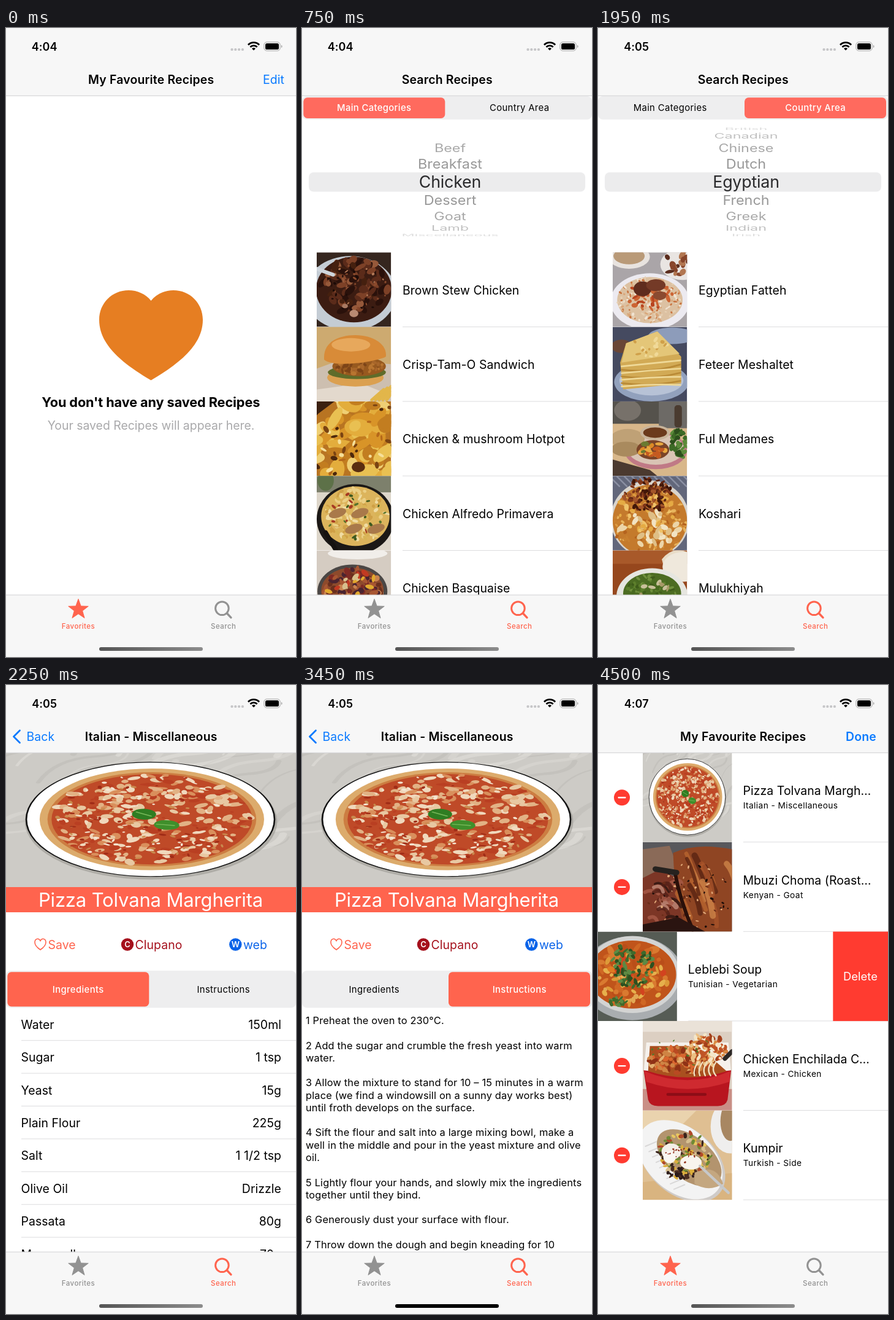
These frames come from a looping animation (473x1024 px, 5.25 s). An HTML page:

```html
<!DOCTYPE html>
<html lang="en">
<head>
<meta charset="utf-8">
<title>Recipe app</title>
<style>
  html, body { margin: 0; width: 100%; height: 100%; overflow: hidden; background: #fff; }
  #stage { display: block; width: 473px; height: 1024px; }
  text { font: 400 19.42px Inter, "Open Sans", sans-serif; letter-spacing: .07px; white-space: pre; }
  .mid { text-anchor: middle; }
  .end { text-anchor: end; }
  .semi { font-weight: 600; letter-spacing: .2px; }
  .clock { font-size: 18px; font-weight: 600; }
  .headline { font-size: 21.7px; font-weight: 700; letter-spacing: -.1px; }
  .hint { letter-spacing: 0; }
  .tab { font-size: 11.5px; font-weight: 500; letter-spacing: .45px; }
  .seg { font-size: 14.85px; letter-spacing: .35px; }
  .on { font-weight: 500; }
  .chosen { font-size: 26.8px; letter-spacing: -.2px; }
  .wheel { font-size: 23.4px; letter-spacing: 0; }
  .banner { font-size: 31px; letter-spacing: -.15px; }
  .badge { font-size: 13px; font-weight: 600; }
  .step { font-size: 16.4px; letter-spacing: .16px; }
  .sub { font-size: 13.7px; letter-spacing: .42px; }
  .delete { font-size: 18.4px; }
  .scene { visibility: hidden; animation: show 5250ms step-end calc(var(--i) * 750ms) infinite; }
  @keyframes show { 0% { visibility: visible; } 14.2858% { visibility: hidden; } }
</style>
</head>
<body>
<svg id="stage" viewBox="0 0 473 1024" xmlns="http://www.w3.org/2000/svg"></svg>
<script>
const ACCENT = '#ff644e', ACCENT_SOFT = '#ff6a5e', BLUE = '#0a7aff', RED = '#ff3b30', GREY = '#929292';

// ---------- primitives ----------
const text = (x, y, s, cls = '', fill = '#000', extra = '') =>
  `<text x="${x}" y="${y}" class="${cls}" fill="${fill}" ${extra}>${s.replace(/&/g, '&amp;')}</text>`;
const rect = (x, y, w, h, fill, r = 0, extra = '') =>
  `<rect x="${x}" y="${y}" width="${w}" height="${h}" rx="${r}" fill="${fill}" ${extra}/>`;
const oval = (x, y, rx, ry, fill, extra = '') =>
  `<ellipse cx="${x}" cy="${y}" rx="${rx}" ry="${ry}" fill="${fill}" ${extra}/>`;
const path = (d, fill, extra = '') => `<path d="${d}" fill="${fill}" ${extra}/>`;
const line = (d, color, w, extra = '') =>
  path(d, 'none', `stroke="${color}" stroke-width="${w}" stroke-linecap="round" ${extra}`);
const rule = (x, y) => rect(x, y - .5, 473 - x, 1, '#dcdcde');
const repeat = (n, fn) => Array.from({ length: n }, (_, i) => fn(i)).join('');

// ---------- food pictures, drawn in a 100 x 100 box ----------
let seed = 1;
const rnd = () => (seed = seed * 16807 % 2147483647) / 2147483647;

function scatter(n, cx, cy, rx, ry, size, colors) {
  return repeat(n, () => {
    const a = rnd() * 6.283, d = Math.sqrt(rnd());
    const x = (cx + rx * d * Math.cos(a)).toFixed(1), y = (cy + ry * d * Math.sin(a)).toFixed(1);
    const w = (size * (.5 + rnd())).toFixed(1), h = (size * (.4 + rnd() * .5)).toFixed(1);
    const fill = colors[Math.floor(rnd() * colors.length)];
    return oval(x, y, w, h, fill, `transform="rotate(${Math.floor(rnd() * 180)} ${x} ${y})"`);
  });
}
const back = fill => rect(0, 0, 100, 100, fill);

const foods = {
  pizza: () => back('#cdcbc6') +
    repeat(36, i => {
      const x = rnd() * 130 - 20, y = rnd() * 100, l = 8 + rnd() * 14;
      return line(`M${x} ${y}q${l * .3} ${-l * .9} ${l} ${-l}t${l * .8} ${-l * .7}`,
        ['#b8b6b1', '#dedcd8', '#e6e4e0'][i % 3], .6 + rnd() * 2.2, 'opacity=".45"');
    }) +
    oval(50, 51, 43.5, 43.2, '#8f8d88', 'opacity=".5"') +
    oval(49.8, 49.4, 42.8, 42.5, '#fff', 'stroke="#111" stroke-width=".55"') +
    oval(50.3, 49.4, 38.7, 37.8, '#dcab6c') + oval(50.3, 49.4, 36, 35, '#cc7d42') +
    oval(50.3, 49.4, 34.6, 33.6, '#bf4a28') +
    scatter(280, 50.3, 49.4, 34, 33, 1.9, ['#e8c8a2', '#f0d8bc', '#e2b285', '#d98f5c', '#b93f22']) +
    scatter(150, 50.3, 49.4, 34, 33, .9, ['#a02c17', '#c98a4e', '#f4e4d0', '#b93f22']) +
    oval(47.6, 45.6, 4.2, 4, '#2f7d22', 'transform="rotate(20 47.6 45.6)"') +
    oval(55.4, 53.6, 4.4, 3.6, '#3f8f2b', 'transform="rotate(12 55.4 53.6)"') +
    line('M45 44l5 3M52 53l6 1', '#77b85a', .6),

  stew: () => back('#35261f') + oval(45, 55, 62, 50, '#c4ccd4') + oval(50, 50, 51, 44, '#3c1c12') +
    scatter(90, 52, 45, 44, 36, 6, ['#2a110b', '#5b2b1a', '#7d4127', '#45200f', '#96593a']) +
    scatter(40, 52, 48, 42, 34, 2, ['#b37a58', '#1d0b07', '#8a4a2c']) +
    oval(50, 82, 6, 5, '#b98a72') + oval(38, 72, 4, 3, '#a97a62') + line('M0 22l22 8', '#cfd6dd', 5),

  burger: () => back('#cdaa70') + path('M0 56L30 45 100 50V100H0Z', '#cdbfb0') +
    path('M0 84l60-8 30 12-20 12H0Z', '#e3d9cd') +
    repeat(5, i => line(`M${74 + i * 5} 98l16 ${-14 - i * 2}`, '#e2b64a', 4)) +
    oval(52, 68, 38, 12, '#dba050') + oval(54, 61, 39, 9, '#5f6c2a') +
    oval(57, 53, 36, 13, '#97591f') + scatter(45, 57, 54, 33, 9, 3, ['#b87530', '#7d4418', '#a8662a']) +
    path('M10 44C8 20 30 11 52 11S95 22 93 40C84 46 24 56 10 44Z', '#d88b38') +
    oval(46, 24, 26, 9, '#ebb066', 'opacity=".8"'),

  hotpot: () => back('#b87422') +
    scatter(75, 50, 50, 66, 66, 13, ['#e3ad3c', '#e9c052', '#d89428', '#efcf74', '#c27d20']) +
    scatter(40, 50, 50, 64, 64, 3.5, ['#7a4312', '#f6e09a', '#4d280c', '#b5681a']) +
    path('M0 0h24L0 18Z', '#3b2010') + oval(56, 88, 9, 7, '#5a2e10'),

  alfredo: () => back('#ddd6ca') + rect(0, 0, 100, 22, '#7d806c') + oval(12, 6, 11, 14, '#5d7148') +
    oval(52, 58, 52, 47, '#1b1816') + oval(52, 54, 46, 40, '#dcb45c') +
    scatter(120, 52, 53, 43, 36, 3.5, ['#ebcf84', '#cfa046', '#f0dca2', '#d8b456']) +
    scatter(25, 52, 53, 40, 32, 2.5, ['#58742c', '#a63a22', '#3f5a20']) +
    repeat(4, i => oval(28 + i * 15, 50 + i % 2 * 22, 12, 6, '#a9794a', `transform="rotate(-18 ${28 + i * 15} 50)"`)) +
    line('M12 76l14 24', '#151210', 6),

  basquaise: () => back('#d5ccc2') + oval(55, 4, 40, 8, '#f1eeea') + oval(48, 55, 47, 36, '#4b4745') +
    oval(48, 54, 42, 31, '#8d4a2c') +
    scatter(100, 48, 53, 39, 28, 4.5, ['#a85632', '#6a2f1d', '#c98350', '#7f2a24', '#4a2430']) +
    scatter(16, 48, 50, 36, 24, 4, ['#e2a92e', '#d8bf8c', '#c23a22']),

  fatteh: () => back('#aaa5a8') + oval(22, 6, 28, 16, '#e8e3df') + oval(22, 5, 21, 11, '#b99a78') +
    oval(94, 16, 30, 21, '#e9e5e2') + scatter(18, 88, 16, 20, 14, 5, ['#5b2d1e', '#87452b', '#b27650']) +
    oval(50, 66, 53, 38, '#eceaf0') + oval(50, 64, 44, 31, '#dcc1a2') +
    scatter(190, 50, 64, 44, 30, 2, ['#f0e3d2', '#e6cfb2', '#c8733f', '#d9a77a']) +
    scatter(35, 50, 58, 32, 18, 3.5, ['#b8441f', '#cc6433']) +
    oval(40, 49, 12, 10, '#5f2c1e') + oval(58, 44, 13, 8, '#743a27') + oval(63, 58, 9, 6, '#8a4a30'),

  feteer: () => back('#454a60') + oval(80, 12, 32, 11, '#8d9cba') + oval(12, 26, 14, 9, '#6a4636') +
    oval(52, 74, 50, 26, '#92a1bd') + oval(52, 72, 43, 20, '#b7c2d6') +
    path('M18 22L60 6 92 40V76L14 84 10 48Z', '#d2aa55') + path('M18 22L60 6 90 36 12 48Z', '#e4c678') +
    repeat(7, i => line(`M12 ${53 + i * 4.5}q40 ${i % 2 ? 5 : -4} 79 ${-8 + i}`, i % 2 ? '#b98a36' : '#efd998', 2.2)) +
    scatter(18, 50, 28, 28, 12, 3, ['#d0a04a', '#f0d998']),

  ful: () => back('#d8b78a') + rect(0, 0, 100, 30, '#55524c') + rect(62, 0, 38, 36, '#6d6a66') +
    oval(20, 12, 18, 14, '#77716a') + rect(83, 5, 10, 30, '#4a3b30', 4) +
    oval(58, 66, 42, 25, '#c07a86') + oval(58, 64, 38, 21, '#d9c4b4') + oval(20, 50, 23, 13, '#bfa176') +
    oval(18, 64, 20, 10, '#a98a5e') + oval(57, 42, 20, 10, '#c8b49a') + oval(57, 42, 16, 7, '#6b3a1c') +
    oval(54, 65, 22, 13, '#7b4428') + scatter(28, 54, 64, 18, 9, 4, ['#de8a26', '#e8a840', '#c55a20', '#6a7a30']) +
    scatter(40, 89, 56, 10, 20, 4, ['#3d6a26', '#5b8a3a', '#2c4f1c']) + path('M0 78L50 92 60 100H0Z', '#4b3a30'),

  koshari: () => back('#62677b') + repeat(12, i => line(`M${i * 10 - 5} 0l14 14`, '#8b90a3', 2)) +
    oval(50, 58, 53, 52, '#d9d4cc') + oval(50, 60, 50, 48, '#c47a2c') +
    scatter(170, 50, 62, 49, 46, 2.6, ['#dc9a40', '#b4631e', '#e8b45c', '#c9802f']) +
    scatter(34, 50, 72, 42, 24, 5, ['#ecd5a8', '#f2e3c2', '#dfbf86']) +
    scatter(28, 46, 48, 38, 30, 3.6, ['#e5ab44', '#efc36a']) +
    scatter(110, 47, 25, 32, 22, 3, ['#5d2412', '#7f3418', '#421708', '#a3552a']),

  mulukhiyah: () => back('#96471d') + rect(0, 0, 100, 18, '#a8592a') + path('M66 12Q80-6 100 2V40L72 34Z', '#e8dcc8') +
    oval(95, 22, 28, 20, '#efe8dc') + oval(53, 62, 48, 38, '#e6e6e0') + oval(53, 58, 39, 28, '#4c6c22') +
    scatter(110, 53, 58, 36, 25, 3, ['#5d7f2c', '#3f5c1a', '#6f8f3c', '#486a20']) +
    scatter(8, 53, 52, 22, 10, 3.5, ['#c9c09a', '#a89a68']) + oval(4, 92, 14, 12, '#3f1c0e'),

  roast: () => back('#58585c') + path('M0 8L30 4 40 30 0 40Z', '#8a6a58') +
    path('M0 40L20 30 45 44 50 100H0Z', '#7c3626') +
    path('M34 12Q60 0 100 8V100H50Q36 70 34 12Z', '#8f4523') +
    repeat(14, i => line(`M${38 + rnd() * 56} ${10 + rnd() * 50}q${6 + rnd() * 6} 12 ${10 + rnd() * 6} ${24 + rnd() * 16}`,
      ['#b8642f', '#5a2412', '#a8532a', '#cd8448'][i % 4], 3 + rnd() * 5, 'opacity=".8"')) +
    repeat(14, i => line(`M${rnd() * 34} ${44 + rnd() * 44}q8 -4 ${8 + rnd() * 8} ${rnd() * 10}`,
      ['#a85a48', '#521e16', '#c08a78', '#2c1410'][i % 4], 2 + rnd() * 4, 'opacity=".8"')) +
    scatter(70, 52, 62, 48, 38, 1.5, ['#1d0d09', '#e0a878', '#6a2c18']) +
    line('M36 34Q42 66 56 98', '#2a100a', 4) + path('M0 92L40 84 70 100H0Z', '#2a1410') +
    line('M14 30l24 4', '#26221f', 6),

  soup: () => back('#565c55') + oval(50, 52, 58, 47, '#a9adb0') + oval(50, 48, 53, 43, '#d3d4d3') +
    oval(50, 48, 49, 38, '#c0541b') +
    scatter(50, 50, 48, 45, 34, 5, ['#cf6724', '#b94e19', '#d97a30']) +
    scatter(42, 48, 54, 42, 28, 3.4, ['#e6b04c', '#dd9a38', '#e2a854']) +
    scatter(10, 48, 52, 38, 24, 5, ['#e07a22', '#d2431f']) +
    scatter(85, 49, 38, 24, 25, 2.8, ['#3f6a2c', '#2d5020', '#5d8a44']) +
    scatter(16, 34, 78, 10, 5, 2.5, ['#3f6a2c', '#5d8a44']),

  bake: () => back('#dccfc2') + rect(0, 76, 100, 24, '#c98f86') + rect(0, 0, 100, 12, '#eae2d8') +
    path('M4 24H96L99 58H1Z', '#f5f1ec') +
    path('M1 55Q50 62 99 55L95 88Q93 95 84 95H17Q8 95 6 88Z', '#b8151f') +
    path('M2 56Q50 76 98 56L97 68Q50 84 4 68Z', '#cf2a30') +
    line('M28 82H70', '#8c0d16', 3) +
    path('M8 28H62L94 56Q50 70 6 56Z', '#a9501f') +
    scatter(130, 40, 44, 34, 15, 3, ['#cf8444', '#8f3216', '#e3b070', '#b94a22', '#d9662e']) +
    scatter(95, 72, 32, 22, 17, 3, ['#d98a42', '#c05426', '#ecc084', '#a3401c', '#f4e6c8']) +
    repeat(5, i => line(`M${62 + i * 5} 46q-6 8 ${-4 + i} 15`, '#f0e0c0', 1.6)) +
    scatter(14, 48, 34, 40, 16, 1.3, ['#4c7a2c']) + line('M92 42l8-8', '#2c2826', 5),

  potato: () => back('#dfbf92') + path('M0 0H60L30 30 0 20Z', '#ead3ae') + path('M0 80L100 70V100H0Z', '#d9b480') +
    oval(98, 18, 22, 30, '#efeeed') + oval(98, 12, 11, 22, '#a88762') +
    oval(44, 57, 55, 37, '#cfcbc8', 'transform="rotate(40 44 57)"') +
    oval(42, 55, 54, 36, '#f3f3f3', 'transform="rotate(40 42 55)"') +
    repeat(9, i => line(`M${3 + i * 4} ${40 + i * 6}l12 -5`, '#d9d8d8', 1.4)) +
    oval(52, 53, 42, 24, '#b3946e', 'transform="rotate(38 52 53)"') +
    scatter(130, 47, 49, 30, 24, 2.6, ['#dcae3c', '#e9c860', '#b04a2a', '#3a241c', '#6f8a34', '#d8c090']) +
    scatter(30, 44, 70, 17, 6, 2.6, ['#2c1c1a', '#4a2c20', '#dcae3c']) +
    path('M58 70Q82 58 90 82 74 92 58 82Z', '#c4a780') +
    oval(32, 46, 11, 9, '#f4efe8') + oval(54, 58, 12, 8, '#f8f4ee') + oval(30, 52, 7, 7, '#faf7f2') +
    scatter(24, 42, 50, 17, 9, 1, ['#8f2c18']) + line('M64 62L96 92', '#c6c8ca', 3),
};

function photo(name, x, y, w, h = w) {
  seed = 4000 + name.length * 97 + name.charCodeAt(0);
  return `<svg x="${x}" y="${y}" width="${w}" height="${h}" viewBox="0 0 100 100" preserveAspectRatio="none">${foods[name]()}</svg>`;
}

// ---------- interface parts ----------
const polar = (cx, cy, r, deg) => {
  const a = deg * Math.PI / 180;
  return `${(cx + r * Math.sin(a)).toFixed(2)} ${(cy - r * Math.cos(a)).toFixed(2)}`;
};
const starPoints = Array.from({ length: 10 }, (_, i) => polar(118, 946.7, i % 2 ? 7 : 17.1, i * 36)).join(' L');
const arc = r => `M${polar(404, 36.5, r, -45)}A${r} ${r} 0 0 1 ${polar(404, 36.5, r, 45)}`;

const statusBar = time => text(62.7, 36.5, time, 'clock mid') +
  repeat(4, i => rect(366.5 + i * 5.8, 33, 4, 4, '#c6c6c8', 1.6)) +
  path(arc(12.8) + arc(7.9), 'none', 'stroke="#000" stroke-width="2.8"') + path(arc(4.2) + 'L404 36.5Z', '#000') +
  rect(421, 23, 26, 14, 'none', 4.2, 'stroke="#9a9a9a"') + rect(423, 25, 22, 10, '#000', 2.6) +
  path('M449 27.5q3 2.5 0 5Z', '#9a9a9a');

function tabBar(active, home) {
  const fav = active === 'fav' ? ACCENT : GREY, find = active === 'find' ? ACCENT : GREY;
  return rect(0, 923, 473, 101, '#f7f7f7') + rect(0, 922.5, 473, 1, '#d2d2d4') +
    path(`M${starPoints}Z`, fav, `stroke="${fav}" stroke-width="1" stroke-linejoin="round"`) +
    oval(352.4, 944.8, 10.8, 10.8, 'none', `stroke="${find}" stroke-width="3"`) +
    line('M360.5 953L367 959.8', find, 3.4) +
    text(118, 977.5, 'Favorites', 'tab mid', fav) + text(354.7, 977.5, 'Search', 'tab mid', find) +
    rect(152, 1008, 169, 6, home, 3);
}

function screen(body, { time, title, tab, action = '', backLink = false, home = 'url(#home)' }) {
  return rect(0, 0, 473, 1024, '#fff') + body + rect(0, 0, 473, 110, '#f7f7f7') +
    rect(0, 109.8, 473, 1, '#cfcfd1') + statusBar(time) + text(236.7, 91, title, 'semi mid') + action +
    (backLink ? line('M22.5 74L12.5 84 22.5 94', BLUE, 2.8, 'stroke-linejoin="round"') + text(33.5, 91, 'Back', '', BLUE) : '') +
    tabBar(tab, home);
}

function segments(y, h, labels, active, color) {
  const base = y + h / 2 + 5.4;
  return rect(0, y, 473, h, '#eeeeef', 8) + rect(active ? 239 : 2.3, y + 2.3, 231, h - 4.3, color, 6.5) +
    labels.map((s, i) => text(i ? 354.7 : 117.7, base, s, 'seg mid' + (i === active ? ' on' : ''),
      i === active ? '#fff' : '#000')).join('');
}

// Rows sit on a wheel of radius 88 turned 19.5 degrees per step.
function wheel(names, selected) {
  return rect(11, 235, 451, 31.5, '#ececed', 8) + names.map((s, i) => {
    const a = (i - selected) * 19.5 * Math.PI / 180, c = Math.cos(a);
    if (i === selected) return text(241.5, 260.4, s, 'chosen mid', '#2a2a2c');
    return text(0, 8.5, s, 'wheel mid', '#000',
      `opacity="${(.05 + .37 * c).toFixed(2)}" transform="translate(241.5 ${250.7 + 88 * Math.sin(a)}) scale(1 ${c})"`);
  }).join('');
}

const dishList = dishes => dishes.map(([pic, name], i) => {
  const y = 365.3 + i * 121.3;
  return photo(pic, 24, y, 121.3) + text(164, y + 68.3, name) + rule(164, y + 121.3);
}).join('');

const searchScreen = (time, active, names, selected, dishes) =>
  screen(segments(111, 38, ['Main Categories', 'Country Area'], active, ACCENT_SOFT) +
    wheel(names, selected) + dishList(dishes), { time, title: 'Search Recipes', tab: 'find' });

const heart = path('M236.5 444C228 433 214 427 200 427C173 427 152 448 152 475C152 515 188 545 236.5 573.5' +
  'C285 545 321 515 321 475C321 448 300 427 273 427C259 427 245 433 236.5 444Z', '#e67e22');

const badge = (x, letter, fill) => oval(x, 422.5, 10.2, 10.2, fill) + text(x, 427.3, letter, 'badge mid', '#fff');

const recipeScreen = (active, body) => screen(
  photo('pizza', 0, 110.5, 473, 219) + rect(0, 329, 473, 41, ACCENT) +
  text(236, 361, 'Pizza Tolvana Margherita', 'banner mid', '#fff') +
  line('M56 431C50 427 47 423 47 419C47 412.5 53.5 411.5 56 416.5C58.5 411.5 65 412.5 65 419C65 423 62 427 56 431Z', ACCENT, 1.6) +
  text(68.5, 430, 'Save', '', ACCENT) + badge(198, 'C', '#a5101c') + text(210.5, 430, 'Clupano', '', '#a5101c') +
  badge(374.3, 'W', '#0a63e8') + text(387, 430, 'web', '', '#0a63e8') +
  segments(465, 60.5, ['Ingredients', 'Instructions'], active, ACCENT) + body,
  { time: '4:05', title: 'Italian - Miscellaneous', tab: 'find', backLink: true, home: active ? '#000' : undefined });

const ingredients = [['Water', '150ml'], ['Sugar', '1 tsp'], ['Yeast', '15g'], ['Plain Flour', '225g'],
  ['Salt', '1 1/2 tsp'], ['Olive Oil', 'Drizzle'], ['Passata', '80g'], ['Mozzarella', '70g']]
  .map(([name, amount], i) => {
    const y = 559.7 + i * 53.4;
    return text(24.5, y, name) + text(449, y, amount, 'end') + rule(25, y + 19);
  }).join('');

const instructions = `1 Preheat the oven to 230°C.

2 Add the sugar and crumble the fresh yeast into warm
water.

3 Allow the mixture to stand for 10 – 15 minutes in a warm
place (we find a windowsill on a sunny day works best)
until froth develops on the surface.

4 Sift the flour and salt into a large mixing bowl, make a
well in the middle and pour in the yeast mixture and olive
oil.

5 Lightly flour your hands, and slowly mix the ingredients
together until they bind.

6 Generously dust your surface with flour.

7 Throw down the dough and begin kneading for 10`
  .split('\n').map((s, i) => text(6, 552 + i * 20.27, s, 'step')).join('');

const saved = [['pizza', 'Pizza Tolvana Margh…', 'Italian - Miscellaneous'],
  ['roast', 'Mbuzi Choma (Roast…', 'Kenyan - Goat'], ['soup', 'Leblebi Soup', 'Tunisian - Vegetarian'],
  ['bake', 'Chicken Enchilada C…', 'Mexican - Chicken'], ['potato', 'Kumpir', 'Turkish - Side']];

const favourites = swiped => screen(saved.map(([pic, name, kind], i) => {
  const y = 110.3 + i * 145.6, open = i === swiped, dx = open ? -89.7 : 0;
  return (open ? '' : oval(39, y + 73, 13, 13, RED) + rect(32.5, y + 71.8, 13, 2.4, '#fff', 1)) +
    photo(pic, 73 + dx, y, 145.6) + text(236.5 + dx, y + 68.6, name) + text(236.7 + dx, y + 90.7, kind, 'sub') +
    rule(237 + dx, y + 145.4) +
    (open ? rect(383.3, y, 89.7, 145.6, RED) + text(428, y + 79, 'Delete', 'delete mid', '#fff') : '');
}).join(''), { time: '4:07', title: 'My Favourite Recipes', tab: 'fav', action: text(454, 91, 'Done', 'semi end', BLUE) });

// ---------- scenes, 750 ms each ----------
const scenes = [
  screen(heart + text(236.3, 617, "You don't have any saved Recipes", 'headline mid') +
    text(236.5, 654, 'Your saved Recipes will appear here.', 'hint mid', '#a9a9ab'),
    { time: '4:04', title: 'My Favourite Recipes', tab: 'fav', action: text(454, 91, 'Edit', 'end', BLUE) }),
  searchScreen('4:04', 0, ['Beef', 'Breakfast', 'Chicken', 'Dessert', 'Goat', 'Lamb', 'Miscellaneous'], 2,
    [['stew', 'Brown Stew Chicken'], ['burger', 'Crisp-Tam-O Sandwich'], ['hotpot', 'Chicken & mushroom Hotpot'],
      ['alfredo', 'Chicken Alfredo Primavera'], ['basquaise', 'Chicken Basquaise']]),
  searchScreen('4:05', 1, ['British', 'Canadian', 'Chinese', 'Dutch', 'Egyptian', 'French', 'Greek', 'Indian', 'Irish'], 4,
    [['fatteh', 'Egyptian Fatteh'], ['feteer', 'Feteer Meshaltet'], ['ful', 'Ful Medames'],
      ['koshari', 'Koshari'], ['mulukhiyah', 'Mulukhiyah']]),
  recipeScreen(0, ingredients),
  recipeScreen(1, instructions),
  favourites(-1),
  favourites(2),
];

document.getElementById('stage').innerHTML =
  `<defs><linearGradient id="home"><stop stop-color="#555"/><stop offset="1" stop-color="#8c8c8c"/></linearGradient></defs>` +
  scenes.map((s, i) => `<g class="scene" style="--i:${i}">${s}</g>`).join('');
</script>
</body>
</html>
```
